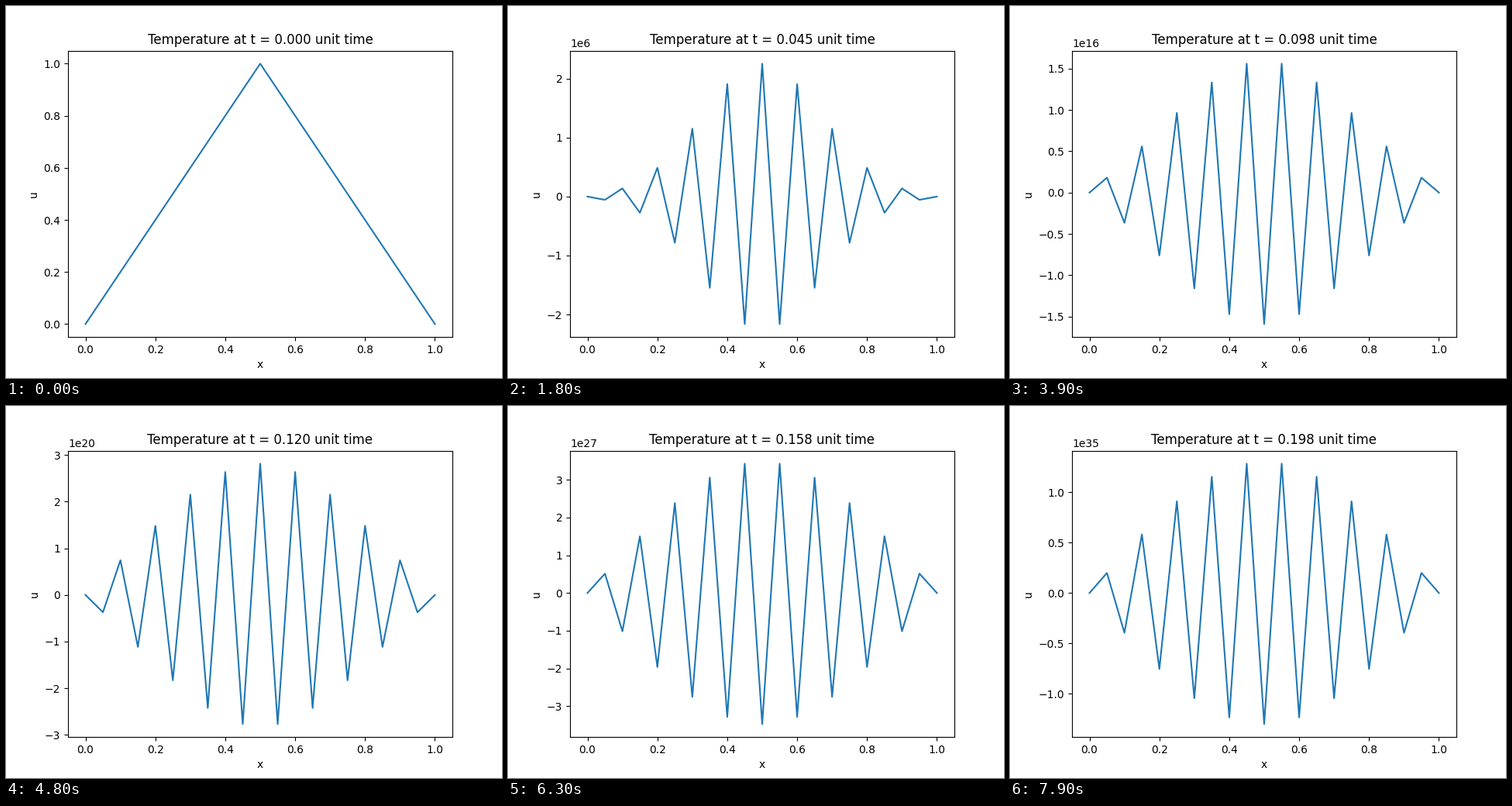
A matplotlib script for the animation above (8 s loop, 640 by 480 pixels).

```python
import numpy as np
import matplotlib.pyplot as plt
from matplotlib.animation import FuncAnimation

FRAMES = 80
INTERVAL = 100
NX = 21
DT = 0.0025

x = np.linspace(0, 1, NX)
dx = 1 / (NX - 1)
r = DT / dx**2


def solve():
    """Explicit heat equation; unstable because r exceeds 1/2."""
    u = np.empty((FRAMES, NX))
    u[0] = 1 - np.abs(2 * x - 1)
    for k in range(1, FRAMES):
        u[k] = u[k - 1]
        u[k, 1:-1] += r * np.diff(u[k - 1], 2)
    return u


u = solve()
fig, ax = plt.subplots(figsize=(6.4, 4.8), dpi=100)


def draw(k):
    ax.clear()
    ax.plot(x, u[k], color="C0", lw=1.5)
    ax.set_title(f"Temperature at t = {k * DT:.3f} unit time")
    ax.set_xlabel("x")
    ax.set_ylabel("u")


anim = FuncAnimation(fig, draw, frames=FRAMES, interval=INTERVAL,
                     init_func=lambda: draw(0), repeat=True, repeat_delay=0)
plt.show()
```
